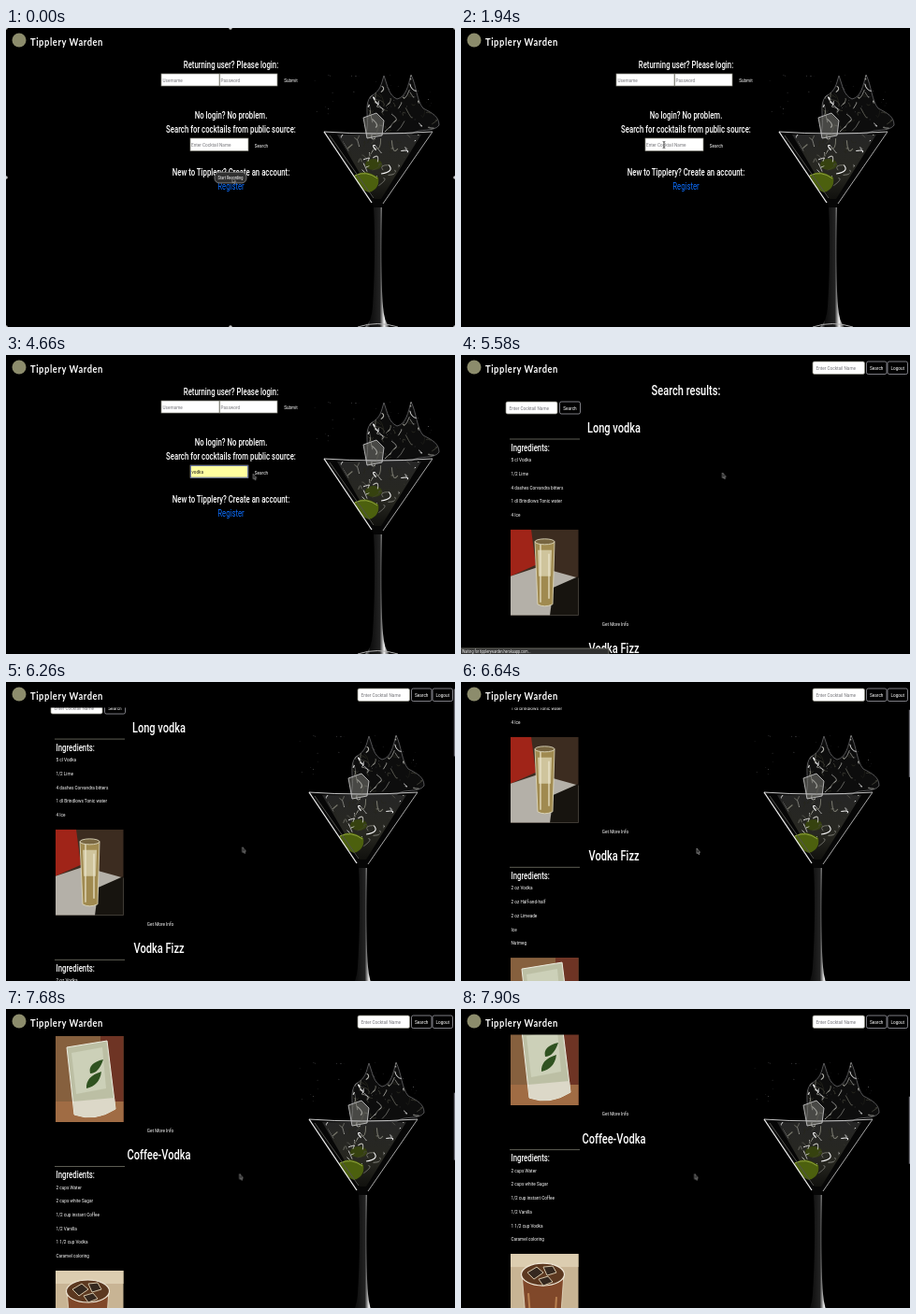
Write an HTML page that moves like this. It is 480x320 px and loops after 8 s.

```html
<!DOCTYPE html>
<html lang="en">
<head>
<meta charset="utf-8">
<title>Cocktail search</title>
<style>
  @property --scroll { syntax: "<number>"; inherits: true; initial-value: 0; }

  html, body { margin: 0; width: 100%; height: 100%; overflow: hidden; background: #000; }
  svg { display: block; width: 100vw; height: 100vh; }
  #stage { animation: scroll 8s linear infinite; }
  text { font-family: Roboto, sans-serif; fill: #fff; white-space: pre; }
  .head { font-weight: 500; }
  .brand { font: 700 12px Lato, sans-serif; letter-spacing: .75px; }
  .hint { fill: #75757a; }
  .dark { fill: #1c1c1c; }
  .link { fill: #0d6efd; }
  .field { fill: #fff; stroke: #8c8c80; stroke-width: .7; }
  .button { fill: #000; stroke: #b4b4bc; stroke-width: .7; }

  .home, .results, .backdrop, .recorder, .status, .menu, .filled, .empty,
  .typed, .preview, .thumb, .arrow, .beam { animation: 8s step-end infinite; }
  .home { animation-name: home; }
  .results { animation-name: results; }
  .backdrop { animation-name: backdrop; }
  .recorder { animation-name: recorder; }
  .status { animation-name: status; }
  .menu { animation-name: menu; }
  .filled, .preview { animation-name: filled; }
  .empty { animation-name: empty; }
  .typed { animation-name: typed; }
  .thumb { animation-name: thumb; }
  .arrow { animation-name: arrow; }
  .beam { animation-name: beam; }
  .content { transform: translateY(calc(var(--scroll) * -1px)); }
  .track { transform: translateY(calc(var(--scroll) * .225px)); }
  .pointer { animation: pointer 8s ease-in-out infinite; }

  @keyframes home { 0% { opacity: 1 } 62%, to { opacity: 0 } }
  @keyframes results { 0% { opacity: 0 } 62%, to { opacity: 1 } }
  @keyframes backdrop { 0% { opacity: 0 } 72.5%, to { opacity: 1 } }
  @keyframes recorder { 0% { visibility: visible } 12%, to { visibility: hidden } }
  @keyframes status { 0% { visibility: visible } 72.25%, to { visibility: hidden } }
  @keyframes menu { 0% { visibility: hidden } 33.75% { visibility: visible } 53%, to { visibility: hidden } }
  @keyframes filled { 0% { visibility: hidden } 43.25%, to { visibility: visible } }
  @keyframes empty { 0% { visibility: visible } 33.75%, to { visibility: hidden } }
  @keyframes typed { 0% { visibility: hidden } 33.75%, to { visibility: visible } }
  @keyframes thumb { 0% { visibility: hidden } 76%, to { visibility: visible } }
  @keyframes arrow { 0% { visibility: visible } 20.5% { visibility: hidden } 39.5%, to { visibility: visible } }
  @keyframes beam { 0% { visibility: hidden } 20.5% { visibility: visible } 39.5%, to { visibility: hidden } }

  @keyframes pointer {
    0%, 12% { transform: translate(242px, 160px) }
    21.25%, 37.5% { transform: translate(217px, 125px) }
    43%, 53% { transform: translate(211px, 142px) }
    60%, 65% { transform: translate(272px, 125px) }
    69.5%, 72.5% { transform: translate(279.5px, 126px) }
    79%, 85.5% { transform: translate(252px, 178px) }
    91%, to { transform: translate(249.7px, 176.5px) }
  }
  @keyframes scroll {
    0%, 76% { --scroll: 0 }
    78% { --scroll: 22 }
    80.5% { --scroll: 88 }
    82% { --scroll: 118 }
    83%, 85.5% { --scroll: 128 }
    86.5% { --scroll: 145 }
    88.75% { --scroll: 228 }
    91.25% { --scroll: 300 }
    93.5% { --scroll: 355 }
    96% { --scroll: 394 }
    98.75%, to { --scroll: 412 }
  }
</style>
</head>
<body>
<svg id="stage" viewBox="0 0 480 320" preserveAspectRatio="none"></svg>
<script>
  const SQUEEZE = 0.78;

  // Text placed by the vertical centre of its capitals.
  const text = (x, y, size, str, cls = "", anchor = "start") =>
    `<text class="${cls}" font-size="${size}" text-anchor="${anchor}"
      transform="translate(${x} ${y + size * 0.35}) scale(${SQUEEZE} 1)">${str}</text>`;
  const mid = (x, y, size, str, cls) => text(x, y, size, str, cls, "middle");
  const box = (x, y, w, h, attrs) => `<rect x="${x}" y="${y}" width="${w}" height="${h}" ${attrs}/>`;
  const path = (d, attrs) => `<path d="${d}" ${attrs}/>`;
  const field = (x, y, w, h, r = 0) => box(x, y, w, h, `rx="${r}" class="field"`);
  const button = (x, y, w, h, label) =>
    box(x, y, w, h, 'rx="1.8" class="button"') + mid(x + w / 2, y + h / 2, 6, label);

  function randomizer(seed) {
    return () => (seed = (seed * 16807) % 2147483647) / 2147483647;
  }

  // Short bright curls scattered through a region, trimmed by a clip path.
  function curls(count, seed, clip, x, y, w, h) {
    const rnd = randomizer(seed);
    const tones = ["#f4f4f4", "#b4b4ae", "#77776c", "#45453a", "#26261e"];
    const span = size => ((rnd() - 0.5) * size).toFixed(1);
    let out = "";
    for (let i = 0; i < count; i++) {
      const px = (x + rnd() * w).toFixed(1), py = (y + rnd() * h).toFixed(1);
      out += path(`M${px} ${py}q${span(14)} ${span(16)} ${span(16)} ${span(22)}`,
        `stroke="${tones[Math.floor(rnd() * 5)]}" stroke-width="${(0.4 + rnd() * 0.8).toFixed(1)}"`);
    }
    return `<g clip-path="url(#${clip})" fill="none">${out}</g>`;
  }

  function droplets() {
    const rnd = randomizer(77);
    let out = "";
    for (let i = 0; i < 40; i++) {
      out += `<circle cx="${330 + rnd() * 125}" cy="${50 + rnd() * 50}" r="${0.2 + rnd() * 0.3}"/>`;
    }
    return `<g fill="#77777a">${out}</g>`;
  }

  const BOWL = "M340 111L456 111L403 188Q401 192 401 200H394Q394 192 391 188Z";
  const SPLASH = "M385 113C389 98 382 82 390 73C401 67 401 60 404 51C408 62 409 72 418 76" +
    "C428 74 430 61 433 50C439 62 439 78 446 86C456 91 463 95 463 104C457 112 442 107 434 113Z";
  const STEM = "M393 192C395 225 394 270 392 298Q391 314 384 320H410Q404 314 403 298C401 270 401 225 402 192Z";

  const defs = `<defs>
    <clipPath id="inBowl">${path("M356 114H442L400 180H394Z", "")}</clipPath>
    <clipPath id="inSplash">${path(SPLASH, "")}</clipPath>
    <clipPath id="inPhoto">${box(0, 0, 72.5, 92, "")}</clipPath>
    <linearGradient id="liquid" x2="0" y2="1">
      <stop stop-color="#303030"/><stop offset=".6" stop-color="#33332a"/><stop offset="1" stop-color="#141410"/>
    </linearGradient>
    <linearGradient id="stem">
      <stop stop-color="#a0a0a0"/><stop offset=".2" stop-color="#0c0c0c"/>
      <stop offset=".6" stop-color="#222"/><stop offset=".78" stop-color="#f4f4f4"/><stop offset="1" stop-color="#1c1c1c"/>
    </linearGradient>
    <g id="glass">
      ${path(BOWL, 'fill="#060606"')}
      ${path("M354 114H444L401 183H394Z", 'fill="url(#liquid)" opacity=".75"')}
      <ellipse cx="393" cy="146" rx="9" ry="6" fill="#36420f"/>
      ${curls(75, 41, "inBowl", 356, 112, 86, 66)}
      ${path("M372 158Q384 150 398 160Q400 172 388 176Q379 174 372 158Z", 'fill="#4c600e"')}
      ${path("M373 158Q385 152 397 161", 'fill="none" stroke="#8ea23a"')}
      ${path(SPLASH, 'fill="#0d0d0d" stroke="#77777a" stroke-width=".7"')}
      ${curls(80, 913, "inSplash", 382, 50, 82, 62)}
      ${path("M382 96L396 91L404 99L402 115L386 118Z", 'fill="#84847e" fill-opacity=".5" stroke="#d4d4d4" stroke-width=".8"')}
      ${droplets()}
      ${path("M340 111Q395 115 456 111", 'fill="none" stroke="#c4c4c4" stroke-width="1"')}
      ${path("M340 111L391 187", 'fill="none" stroke="#eee" stroke-width="1.3"')}
      ${path("M346 115L393 182", 'fill="none" stroke="#50504c" stroke-width="1"')}
      ${path("M456 111L403 188", 'fill="none" stroke="#a8a8a8" stroke-width="1"')}
      ${path(STEM, 'fill="url(#stem)"')}
      ${path("M376 320Q397 313 419 320", 'fill="none" stroke="#b0b0b0"')}
    </g>
  </defs>`;

  const home = `<g class="home">
    <use href="#glass"/>
    ${mid(240.5, 39, 10, "Returning user? Please login:", "head")}
    ${field(166, 49, 62, 13)}${text(167.5, 55.5, 6, "Username", "hint")}
    ${field(228.5, 49, 61.5, 13)}${text(229.5, 55.5, 6, "Password", "hint")}
    ${mid(304.5, 56, 6, "Submit")}
    ${mid(240.5, 93, 10, "No login? No problem.", "head")}
    ${mid(240.5, 108, 10, "Search for cocktails from public source:", "head")}
    ${field(197, 118, 62, 13.5)}
    ${box(197.4, 118.4, 61.2, 12.7, 'class="filled" fill="#ffffa0" stroke="#4a5a9c" stroke-width=".8"')}
    ${text(198, 125, 6, "Enter Cocktail Name", "hint empty")}
    ${text(198.5, 125, 6, '<tspan class="typed">v</tspan><tspan class="preview">odka</tspan>', "dark")}
    ${mid(273, 126, 6, "Search")}
    <g class="menu">
      ${box(197, 133, 61.5, 18, 'fill="#ececec"')}
      ${box(197, 137, 61.5, 10, 'fill="#d4d4de"')}
      ${text(200.5, 142, 5.5, "vodka", "dark")}
    </g>
    ${mid(240.5, 154, 10, "New to Tipplery? Create an account:", "head")}
    ${mid(240.5, 169, 10, "Register", "link")}
    <g class="recorder">
      ${box(223, 154.3, 34, 11.6, 'rx="5" fill="#303030" stroke="#8c8c8c" stroke-width=".8"')}
      ${mid(240, 160, 5, "Start Recording")}
      <g fill="#c8c8c8">${[[0, 0], [240, 0], [480, 0], [0, 160], [480, 160], [0, 320], [240, 320], [480, 320]]
        .map(([x, y]) => `<circle cx="${x}" cy="${y}" r="1.8"/>`).join("")}</g>
    </g>
  </g>`;

  const photos = [
    box(0, 0, 73, 92, 'fill="#3c2c20"') +
      path("M0 0H22L27 38L0 50Z", 'fill="#a02418"') +
      path("M0 50L30 40L73 52V92H0Z", 'fill="#b4b0a8"') +
      path("M46 62L73 50V92H42Z", 'fill="#17140f"') +
      path("M26 13H47L45 80Q36 84 29 80Z", 'fill="#a08a50" stroke="#e4dec0" stroke-width=".8"') +
      path("M29 22H44L43 50H30Z", 'fill="#cfc49c"') +
      path("M32 15V78M41 26V74", 'stroke="#eee8d0" stroke-width="1.2"') +
      '<ellipse cx="36.5" cy="13" rx="10.5" ry="3" fill="#776540" stroke="#e8e2c8" stroke-width=".8"/>',
    box(0, 0, 73, 92, 'fill="#86603e"') +
      box(48, 0, 25, 92, 'fill="#6e3424"') +
      path("M0 70H73V92H0Z", 'fill="#a06c44"') +
      path("M12 12L55 5L64 78Q42 92 20 84Z", 'fill="#bcbfa4" stroke="#ecece0" stroke-width="1"') +
      path("M19 70L63 66L64 78Q42 92 20 84Z", 'fill="#dcd8c8"') +
      path("M17 18L50 12L54 56L22 62Z", 'fill="#ccd0b8"') +
      path("M51 25Q34 29 37 40Q46 40 51 25M49 38Q32 43 33 56Q47 53 49 38Z", 'fill="#2f5220"'),
    box(0, 0, 73, 92, 'fill="#c8b494"') +
      box(0, 0, 73, 14, 'fill="#dccdb0"') +
      path("M12 20L18 92H52L57 20Z", 'fill="#80482a" stroke="#e6dcc4" stroke-width=".8"') +
      '<ellipse cx="34.5" cy="22" rx="23" ry="12" fill="#5c3820" stroke="#f0e8d8" stroke-width="1.2"/>' +
      path("M18 20L28 14L35 20L25 27ZM35 14L45 13L49 20L39 23ZM30 27L40 24L45 30L35 34Z",
        'fill="#35281f" stroke="#d4c4a8" stroke-width="1"') +
      path("M19 42L23 92M49 46L46 92", 'stroke="#b88050" stroke-width="2"')
  ];

  const recipes = [
    ["Long vodka", ["5 cl Vodka", "1/2 Lime", "4 dashes Corvandra bitters", "1 dl Brindlows Tonic water", "4 Ice"]],
    ["Vodka Fizz", ["2 oz Vodka", "2 oz Half-and-half", "2 oz Limeade", "Ice", "Nutmeg"]],
    ["Coffee-Vodka", ["2 cups Water", "2 cups white Sugar", "1/2 cup instant Coffee", "1/2 Vanilla", "1 1/2 cup Vodka", "Caramel coloring"]]
  ];
  const ROW = 14.7;
  let nextY = 78;
  const list = recipes.map(([name, items], i) => {
    const y = nextY, photoY = y + 50 + ROW * (items.length - 1);
    nextY = photoY + 127.5;
    return mid(163.5, y, 14.2, name, "head") +
      path(`M52 ${y + 12}H127`, 'stroke="#77776a" stroke-width=".8"') +
      text(53.5, y + 21, 10, "Ingredients:", "head") +
      items.map((item, n) => text(53.5, y + 34 + n * ROW, 6, item)).join("") +
      `<g transform="translate(53 ${photoY})" clip-path="url(#inPhoto)">${photos[i]}</g>` +
      mid(165, photoY + 101, 6, "Get More Info");
  }).join("");

  const results = `<g class="results">
    <g class="backdrop"><use href="#glass" transform="translate(-16 7)"/></g>
    <g class="content">
      ${mid(240.5, 38, 14.2, "Search results:", "head")}
      ${field(48, 50, 55, 13, 1.8)}${text(51.5, 56.5, 6, "Enter Cocktail Name", "hint")}
      ${button(105.5, 50, 22, 13, "Search")}
      ${list}
    </g>
    ${box(0, 0, 480, 27.5, 'fill="#000"')}
    ${field(376, 7, 55.5, 13.5, 1.8)}${text(379.5, 14, 6, "Enter Cocktail Name", "hint")}
    ${button(433.5, 7, 21.5, 13.5, "Search")}
    ${button(456, 7, 21.5, 13.5, "Logout")}
    <g class="thumb">${box(478.8, 1, 1.2, 72, 'class="track" fill="#6c6c74"')}</g>
    <g class="status">
      ${box(-1, 314, 159, 8, 'fill="#303030" stroke="#8c8c80" stroke-width=".7"')}
      ${text(1, 317.2, 4.8, "Waiting for tipplerywarden.herokuapp.com...")}
    </g>
  </g>`;

  const header = '<circle cx="14" cy="13" r="7.5" fill="#8c8c6c"/>' +
    text(26, 15, 12, "Tipplery Warden", "brand");

  const pointer = `<g class="pointer">
    ${path("M0 0V5.6L1.2 4.6L2.1 6.6L3 6.2L2.1 4.3H3.6Z", 'class="arrow" fill="#1c1c1c" stroke="#c8c8c8" stroke-width=".5"')}
    ${path("M-1.3-3.5Q0-3.5 0-2.5Q0-3.5 1.3-3.5M0-2.5V2.5M-1.3 3.5Q0 3.5 0 2.5Q0 3.5 1.3 3.5", 'class="beam" fill="none" stroke="#222" stroke-width=".8"')}
  </g>`;

  document.getElementById("stage").innerHTML = defs + home + results + header + pointer;
</script>
</body>
</html>
```
